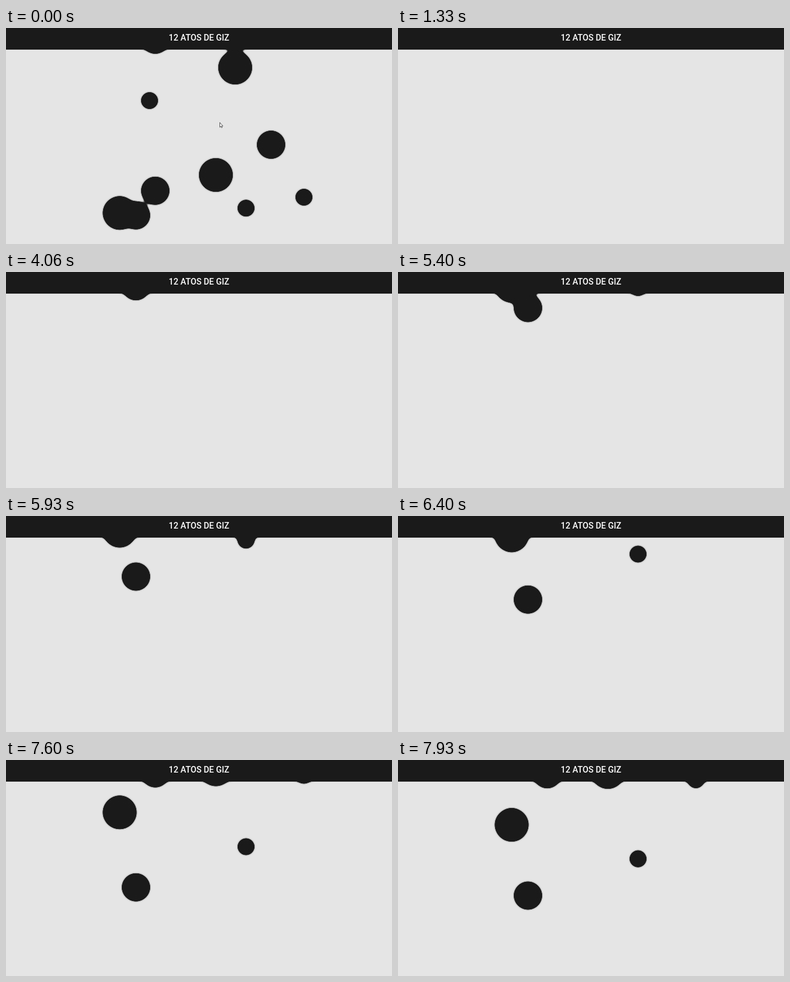
Animation, 640 px wide and 360 px high, one loop 8 s. Source, as an HTML page:

```html
<!DOCTYPE html>
<html lang="pt">
<head>
<meta charset="utf-8">
<title>12 ATOS DE GIZ</title>
<style>
  html, body { margin: 0; width: 100%; height: 100%; overflow: hidden; background: #e5e5e5; }
  svg { display: block; width: 640px; height: 360px; }
  text { font: 500 14px Roboto, Arial, sans-serif; fill: #fff; text-anchor: middle; }
</style>
</head>
<body>
<svg viewBox="0 0 640 360">
  <defs>
    <filter id="goo" filterUnits="userSpaceOnUse" x="-20" y="-30" width="680" height="420" color-interpolation-filters="sRGB">
      <feGaussianBlur stdDeviation="5"/>
      <feColorMatrix values="1 0 0 0 0  0 1 0 0 0  0 0 1 0 0  0 0 0 18 -7"/>
      <feDropShadow dx="0" dy="0" stdDeviation="1.2" flood-color="#000" flood-opacity=".5"/>
    </filter>
  </defs>
  <g id="drops" filter="url(#goo)" fill="#1a1a1a">
    <rect x="-60" y="-60" width="760" height="94.2"/>
  </g>
  <rect width="640" height="36" fill="#1a1a1a"/>
  <text x="320" y="20.8">12 ATOS DE GIZ</text>
  <path id="cursor" d="M.5 .5V8.4L2.3 6.8L3.4 9.2L4.6 8.7L3.5 6.3H5.6Z" fill="#fff" stroke="#333" stroke-width=".8"/>
</svg>
<script>
const LOOP = 8000, RESET = 260;
const S = 13.8, M = 23, L = 27.5;
const HIDDEN = -30, HANG = 24.5, FALL = 255, EMERGE = 2800;

// old: height before the reset; drop: when it lets go; time: length of its fall
const drops = [
  { x: 215.5, r: M, old: 312.3, drop: 4517, time: 7000 },
  { x: 188.5, r: L, old: 308.3, drop: 5960, time: 9200 },
  { x: 398, r: S, old: 300.3, drop: 5300, time: 8250 },
  { x: 247.5, r: M, old: 271.3, drop: 8330, time: 8000 },
  { x: 348, r: L, old: 245, drop: 8900, time: 8000 },
  { x: 494, r: S, old: 282, drop: 7530, time: 8000 },
  { x: 247.5, r: M, old: 19.5 },
  { x: 380, r: L, old: 66 },
  { x: 238, r: S, old: 121 },
  { x: 439.5, r: M, old: 194.5 }
];

const cursor = document.getElementById("cursor");
const cursorMoves = [530, 600, 730], CURSOR_GONE = 1330;

const bezier = (a, b, s) => 3 * (1 - s) ** 2 * s * a + 3 * (1 - s) * s * s * b + s ** 3;

// the CSS "ease" curve
function ease(x) {
  if (x <= 0) return 0;
  if (x >= 1) return 1;
  let lo = 0, hi = 1;
  for (let i = 0; i < 20; i++) {
    const mid = (lo + hi) / 2;
    if (bezier(0.25, 0.25, mid) < x) lo = mid; else hi = mid;
  }
  return bezier(0.1, 1, lo);
}

function height(d, t) {
  if (t < RESET) return d.old;
  if (!d.drop) return HIDDEN;
  const emerged = ease((t - d.drop + EMERGE) / EMERGE);
  const fallen = ease((t - d.drop) / d.time);
  return HIDDEN + (HANG - HIDDEN) * emerged + FALL * fallen;
}

for (const d of drops) {
  d.node = document.createElementNS("http://www.w3.org/2000/svg", "circle");
  d.node.setAttribute("cx", d.x);
  d.node.setAttribute("r", d.r);
  document.getElementById("drops").append(d.node);
}

function draw(t) {
  for (const d of drops) d.node.setAttribute("cy", height(d, t).toFixed(2));
  const moved = cursorMoves.filter(m => m <= t).length / cursorMoves.length;
  cursor.setAttribute("transform", `translate(${354 + 285 * moved} ${157 + 40 * moved})`);
  cursor.style.display = t < CURSOR_GONE ? "" : "none";
}

const start = performance.now();
function tick() {
  draw((performance.now() - start) % LOOP);
  requestAnimationFrame(tick);
}
draw(0);
requestAnimationFrame(tick);
</script>
</body>
</html>
```
